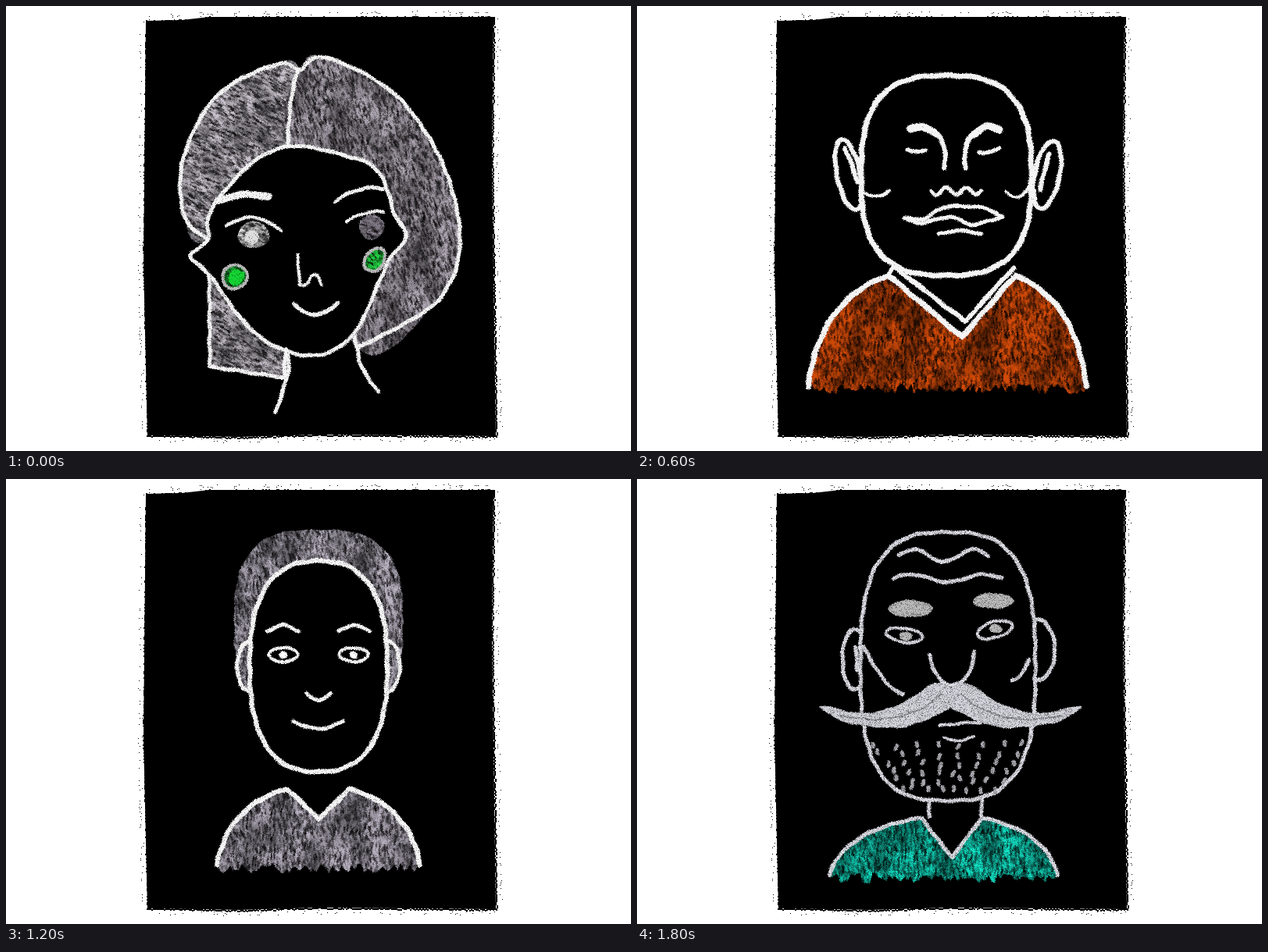
An HTML page with a canvas that plays this animation: 800x570 px, repeating every 2000 ms.

```html
<!DOCTYPE html>
<html lang="en">
<head>
<meta charset="utf-8">
<title>Chalk portraits</title>
<style>
html, body { margin: 0; width: 100%; height: 100%; overflow: hidden; background: #fff; }
canvas { position: absolute; left: 0; top: 0; width: 800px; height: 570px; }
.portrait { visibility: hidden; animation: show 2s step-end infinite; }
@keyframes show {
  0% { visibility: visible; }
  10%, 100% { visibility: hidden; }
}
</style>
</head>
<body>
<script>
const W = 800, H = 570, SLOT = 200, PI = Math.PI;
let seed = 7, g;

function rnd() {
  seed = (seed + 0x6D2B79F5) | 0;
  let t = Math.imul(seed ^ (seed >>> 15), 1 | seed);
  t = (t + Math.imul(t ^ (t >>> 7), 61 | t)) ^ t;
  return ((t ^ (t >>> 14)) >>> 0) / 4294967296;
}

function sheet(w = W, h = H) {
  const c = document.createElement('canvas');
  c.width = w;
  c.height = h;
  return c;
}

const points = s => s.match(/[\d.]+,[\d.]+/g).map(p => p.split(',').map(Number));
const flip = (s, axis) => points(s).map(([x, y]) => `${2 * axis - x},${y}`).join(' ') + (s.endsWith('z') ? 'z' : '');

// Smooth curve through points; a trailing z closes it, a leading M means plain path data.
function curve(s) {
  if (s instanceof Path2D) return s;
  if (s[0] === 'M') return new Path2D(s);
  const p = points(s), n = p.length, closed = s.endsWith('z'), path = new Path2D();
  const at = i => closed ? p[(i + n) % n] : p[Math.max(0, Math.min(n - 1, i))];
  path.moveTo(...p[0]);
  for (let i = 0; i < (closed ? n : n - 1); i++) {
    const [a, b, c, d] = [at(i - 1), at(i), at(i + 1), at(i + 2)];
    path.bezierCurveTo(b[0] + (c[0] - a[0]) / 6, b[1] + (c[1] - a[1]) / 6,
      c[0] - (d[0] - b[0]) / 6, c[1] - (d[1] - b[1]) / 6, c[0], c[1]);
  }
  return path;
}

// Points along a superellipse; a lower power is squarer, spike varies the radius.
function ring(cx, cy, rx, ry, power, from = 0, to = 2 * PI, n = 40, spike = 0) {
  const bend = v => Math.sign(v) * Math.abs(v) ** power;
  return Array.from({ length: n + 1 }, (_, i) => {
    const t = from + (to - from) * i / n, k = 1 + spike * (i % 2 ? rnd() : -rnd());
    return `${(cx + rx * k * bend(Math.cos(t))).toFixed(1)},${(cy + ry * k * bend(Math.sin(t))).toFixed(1)}`;
  }).join(' ');
}

// Row of round bumps from point to point.
function scallop(s, sweep, round = 0.52) {
  const p = points(s);
  return p.slice(1).reduce((d, [x, y], i) => {
    const r = Math.hypot(x - p[i][0], y - p[i][1]) * round;
    return `${d}A${r} ${r} 0 0 ${sweep} ${x} ${y}`;
  }, 'M' + p[0]);
}

// Wavy line.
function wave(x0, x1, y, rise, turns) {
  return Array.from({ length: 13 }, (_, i) =>
    `${x0 + (x1 - x0) * i / 12},${y - rise * Math.sin(i / 12 * PI * turns)}`).join(' ');
}

// Single arch between two points; a negative rise hangs down.
const arch = (x0, y0, x1, y1, rise) => `M${x0} ${y0}Q${(x0 + x1) / 2} ${(y0 + y1) / 2 - 2 * rise} ${x1} ${y1}`;

function oval(x, y, rx, ry = rx, turn = 0) {
  const path = new Path2D();
  path.ellipse(x, y, rx, ry, turn, 0, 7);
  return path;
}

function line(width, ...shapes) {
  g.lineWidth = width;
  for (const s of shapes) g.stroke(curve(s));
}

function both(axis, width, ...shapes) {
  for (const s of shapes) line(width, s, flip(s, axis));
}

function solid(color, ...shapes) {
  g.fillStyle = color;
  for (const s of shapes) g.fill(curve(s));
}

// Black inside, chalk around.
function hollow(width, ...shapes) {
  solid('#000', ...shapes);
  line(width, ...shapes);
}

const TILE = 256, streaks = sheet(TILE, TILE);
{
  const c = streaks.getContext('2d');
  c.lineCap = 'round';
  const mark = (len, width, alpha) => {
    const x = rnd() * TILE, y = rnd() * TILE;
    c.lineWidth = width;
    c.strokeStyle = `rgba(0,0,0,${alpha})`;
    c.beginPath();
    for (const u of [x, x - TILE]) {
      for (const v of [y, y - TILE]) {
        c.moveTo(u, v);
        c.lineTo(u + len, v);
      }
    }
    c.stroke();
  };
  for (let i = 0; i < 160; i++) mark(8 + rnd() * 14, 12 + rnd() * 14, 0.12);
  for (let i = 0; i < 6500; i++) mark(1 + rnd() * 7, 0.8 + rnd() * 1.4, 0.2 + rnd() * 0.5);
}

// Chalk rubbing: flat colour under dark streaks at an angle in degrees.
function rub(color, angle, ...shapes) {
  const pattern = g.createPattern(streaks, 'repeat');
  pattern.setTransform(new DOMMatrix().rotate(angle));
  for (const s of shapes) {
    solid(color, s);
    g.fillStyle = pattern;
    g.fill(curve(s));
  }
}

// Rubbed garment with round shoulders, V neck and ragged hem.
function shirt(color, width, [left, right, top], [x0, x1, bottom], [vx, vy]) {
  const cy = top + (bottom - top) * 0.22;
  const cl = x0 + (left - x0) * 0.14, cr = x1 - (x1 - right) * 0.14;
  let hem = '';
  for (let x = x1 - 4; x > x0; x -= 4) hem += `L${x} ${bottom - 4 + rnd() * 14}`;
  const body = `M${left} ${top}L${vx} ${vy} ${right} ${top}Q${cr} ${cy} ${x1} ${bottom}${hem}L${x0} ${bottom}Q${cl} ${cy} ${left} ${top}Z`;
  rub(color, 88, body);
  line(width, `M${x0} ${bottom}Q${cl} ${cy} ${left} ${top}L${vx} ${vy} ${right} ${top}Q${cr} ${cy} ${x1} ${bottom}`);
  return curve(body);
}

// Wobble and dust the finished drawing.
function weather(dust) {
  const src = g.getImageData(0, 0, W, H), out = g.createImageData(W, H);
  const from = new Uint32Array(src.data.buffer), to = new Uint32Array(out.data.buffer);
  for (let y = 4; y < H - 4; y++) {
    for (let x = 165; x < 640; x++) {
      const dx = Math.round(Math.sin(y * 0.21 + x * 0.07) * 0.6 + (rnd() - 0.5) * 1.1);
      const dy = Math.round(Math.sin(x * 0.19 - y * 0.05) * 0.6 + (rnd() - 0.5) * 1.1);
      const i = y * W + x, v = from[i + dy * W + dx];
      if (!v) continue;
      to[i] = v;
      const k = rnd() < dust ? 0.55 + rnd() * 0.35 : 1;
      for (let c = 0; c < 3; c++) out.data[i * 4 + c] *= k;
    }
  }
  g.putImageData(out, 0, 0);
}

function paper() {
  const c = sheet(), edge = points('179,19 225,18 260,14 400,14 624,14 622,200 627,551 400,549 300,552 181,550 176,330');
  g = c.getContext('2d');
  solid('#000', 'M' + edge.join('L') + 'Z');
  edge.forEach(([x, y], i) => {
    const [u, v] = edge[(i + 1) % edge.length], len = Math.hypot(u - x, v - y);
    const nx = (v - y) / len, ny = (x - u) / len;
    const dot = (s, d, size) => g.fillRect(Math.round(x + (u - x) * s / len + nx * d), Math.round(y + (v - y) * s / len + ny * d), size, size);
    for (let s = 0; s < len; s += 2) {
      dot(s, rnd() * 2 - 1, 2);
      if (rnd() < 0.08) dot(s, rnd() * 6, 1);
      if (rnd() < 0.18) dot(s, 5 + rnd() * 3, 1);
    }
  });
  document.body.append(c);
}

function bob() {
  const left = '374,82 345,75 270,115 227,195 228,268 258,300', right = '376,82 410,66 500,115 560,205 581,305 550,380 450,438';
  const face = '262,262 310,205 360,180 420,188 475,210 498,268 512,295 488,330 445,420 390,448 320,420 258,342 236,320 258,300z';
  const lock = 'M260 345L261 462 356 476 358 440Z';
  rub('#c8c2cc', 30, left + ' 360,180z', lock);
  rub('#aca4b0', 75, right + ' 360,180z');
  line(5, left, right, lock);
  hollow(5, face);
  line(5, '374,80 365,120 360,180', '358,440 362,465 345,521', '446,420 455,462 476,494',
    arch(368, 382, 425, 380, -14), arch(422, 250, 482, 234, 7));
  line(9, arch(272, 250, 336, 245, 6));
  line(4, arch(282, 282, 352, 288, 14), arch(436, 276, 484, 264, 5), 'M373 318L376 357Q387 360 390 346 400 340 404 358');
  rub('#fff', 20, oval(317, 293, 20, 17));
  solid('#ddd', oval(315, 296, 9));
  rub('#aaa0b0', 20, oval(468, 283, 16));
  const cheeks = [oval(293, 347, 16, 15), oval(472, 325, 12, 16, 0.6)];
  rub('#28f04c', 40, ...cheeks);
  solid('#14d232', oval(294, 348, 10));
  g.strokeStyle = '#bbb';
  line(4, ...cheeks);
}

// Plain sitter built from a few proportions.
function sitter({ top, rx, hair, spread, rim }) {
  const cx = 400, chin = top + 300, eye = top + 150;
  shirt('#b4aebc', 6, [360, 440, chin + 22], [cx - spread, cx + spread, chin + 120], [cx, chin + 60]);
  rub('#b8b2c0', 80, ring(cx, top + 110, rx + 20, 110 + hair, 0.7));
  line(5, oval(cx - rx, eye + 15, 16, 32), oval(cx + rx, eye + 15, 16, 32));
  hollow(6, ring(cx, top + 165, rx, 135, 0.8));
  both(cx, 5, '335,' + (eye - 30) + ' 355,' + (eye - 38) + ' 374,' + (eye - 30));
  for (const x of [cx - 45, cx + 45]) {
    line(4, oval(x, eye, rim, rim / 2));
    solid('#fff', oval(x, eye, 5));
  }
  line(5, arch(cx - 15, eye + 50, cx + 15, eye + 50, -8), arch(cx - 32, eye + 85, cx + 32, eye + 85, -10));
}

function curls() {
  const half = '398,91 505,118 540,178 563,255 550,362';
  const crown = scallop(flip(half, 398).split(' ').reverse().join(' ') + half.slice(6), 1, 0.75);
  const tails = ['260,368 320,398 378,374 374,442 325,447 262,410z', '454,368 500,372 549,363 524,446 480,430z'];
  rub('#d8d2e0', 65, crown + 'L452 372 380 378 322 395Z');
  solid('#000', ...tails);
  rub('#e0740c', 85, ...tails);
  line(5, crown, ...tails.map(t => 'M' + points(t).slice(2).join('L')).slice(0, 0));
  line(5, 'M246 362Q262 365 262 372Q250 395 265 412L305 434Q340 456 366 447 383 410 378 374', 'M550 362Q535 400 528 438 505 460 480 430L452 372');
  hollow(5, oval(395, 285, 103, 99));
  line(4, 'M377 96Q362 140 364 186', 'M458 105L437 198', arch(306, 243, 358, 218, 7), arch(435, 230, 478, 225, 5),
    arch(310, 272, 358, 269, 6), arch(448, 266, 488, 267, 6), arch(388, 308, 415, 308, -5), arch(380, 331, 436, 325, -7));
  const cheeks = [oval(342, 311, 14), oval(470, 300, 15)];
  rub('#16c060', 30, ...cheeks);
  line(4, ...cheeks);
}

function elder() {
  shirt('#d24a08', 7, [322, 484, 345], [219, 575, 487], [416, 424]);
  line(6, 'M322 345L328 333 420 404 482 335', oval(271, 216, 15, 46, -0.2), oval(525, 216, 16, 44, 0.2),
    arch(528, 190, 516, 235, 3), arch(266, 182, 282, 225, 3));
  hollow(7, ring(396, 217, 109, 128, 0.72));
  both(407, 6, '350,160 372,156 392,176 394,208');
  both(407, 9, '350,157 366,154 382,164');
  line(5, arch(346, 184, 370, 184, -3), arch(438, 187, 464, 182, -3), wave(377, 440, 237, -5, 5),
    '342,272 370,272 392,258 440,258 468,270', '342,272 365,278 400,270 430,280 468,270', arch(386, 292, 440, 292, 4));
  line(4, arch(290, 238, 323, 236, -7), arch(473, 238, 502, 233, -9));
}

function redHair() {
  rub('#f8560f', 65, ring(393, 215, 110, 155, 0.8, PI - 0.12, 2 * PI + 0.12, 46, 0.09).replace(/^/, 'M').replaceAll(' ', 'L'));
  g.strokeStyle = '#dddde2';
  const coat = '355,408 315,453 290,447 277,465 270,515', lapel = '370,430 374,470 390,522';
  for (const turn of [s => s, s => flip(s, 401)]) {
    const [outer, inner] = [turn(coat), turn(lapel)];
    rub('#92929c', 88, 'M' + points(outer).join('L') + 'L' + points(inner).reverse().join('L') + 'Z');
    line(6, outer, inner);
  }
  line(6, oval(301, 292, 17, 45, -0.4), oval(489, 280, 16, 41, 0.25));
  line(4, arch(290, 272, 305, 305, 4), arch(494, 262, 482, 288, 4));
  solid('#000', '312,250 345,118 440,115 488,225 466,292 430,425 372,428 335,322z');
  line(6, '306,250 318,170 345,118 375,120 405,127 440,115 470,160 488,225 480,255 447,302',
    '330,322 342,350 352,390 372,428 400,436 430,425 458,350 466,292', '358,245 362,285 385,305 405,300 428,262 410,243 400,250');
  const whiskers = '342,350 350,325 385,305 425,315 455,357 425,342 395,330z';
  rub('#b4b4bc', 35, whiskers);
  line(5, whiskers, wave(353, 438, 149, 5, 3), wave(330, 455, 178, 8, 3), arch(306, 250, 340, 260, -5), arch(440, 258, 470, 238, -5),
    '365,350 395,358 435,345 425,370 405,378 385,372z');
  line(9, wave(322, 458, 204, 6, 3));
  line(4, oval(338, 229, 19, 9, 0.15), oval(433, 223, 20, 10, -0.1));
  solid('#ccc', oval(342, 230, 7, 5), oval(434, 223, 7, 5));
  g.strokeStyle = '#b9b9c0';
  for (let i = 0; i < 3; i++) line(7, `M${394 + i * 9} 388v${62 + rnd() * 20}`);
}

function afro() {
  const body = shirt('#9089a2', 5, [352, 435, 381], [270, 513, 493], [380, 475]);
  g.save();
  g.clip(body);
  hollow(5, oval(312, 420, 24), oval(357, 446, 13, 18), oval(425, 440, 19), oval(295, 475, 20), oval(468, 408, 22), oval(482, 474, 22), oval(418, 489, 14));
  g.restore();
  line(5, scallop(ring(399, 190, 145, 106, 0.8, PI - 0.95, 2 * PI + 0.95, 11), 1));
  hollow(6, ring(405, 160, 91, 223, 0.9, 0, PI) + ' 315,165');
  line(5, scallop('315,164 366,155 413,147 465,156', 0, 0.8), 'M495 175Q490 155 465 156 405 170 420 246', arch(362, 155, 378, 168, 3),
    '370,238 370,255 380,262 405,259 435,262 445,255 447,236',
    '363,305 380,284 405,287 418,283 450,298 435,325 405,343 380,330z', wave(366, 450, 304, 3, 3));
  line(3, 'M403 312V324');
  rub('#eee', 10, oval(461, 190, 22, 12, -0.3));
  line(4, arch(326, 193, 382, 200, 15) + arch(382, 200, 326, 193, -9).replace('M', 'L'));
  solid('#fff', oval(352, 187, 10, 7), oval(462, 187, 8, 7));
}

function beard() {
  const bumps = scallop(ring(402, 350, 154, 106, 0.6, PI + 0.25, 0, 15), 0);
  const mouth = 'M318 302L400 299 484 302 415 328 478 335Q395 388 322 332L358 324 330 320Z';
  rub('#a096ac', 50, bumps + 'L520 300 450 248Q390 292 346 246L272 282Z');
  hollow(6, mouth);
  line(6, bumps, arch(272, 282, 345, 246, 3), arch(450, 248, 556, 350, 16), 'M272 282L258 318',
    oval(275, 184, 21, 46), oval(524, 190, 22, 50), arch(275, 163, 285, 185, 3), wave(515, 510, 200, 0, 1),
    '515,175 508,195 518,210 508,225', arch(240, 430, 198, 474, 5), arch(548, 450, 566, 521, 4));
  const skull = '272,282 298,160 330,82 405,60 465,85 502,190 515,295';
  solid('#000', 'M275 275L298 160 330 82 405 60 465 85 502 190 510 285 450 248Q390 292 346 246Z');
  line(7, skull, 'M346 230C352 284 448 280 452 228');
  line(14, arch(325, 158, 364, 140, 6), arch(436, 138, 474, 147, 9));
  solid('#fff', oval(347, 180, 8, 10), oval(436, 188, 11));
}

function moustache() {
  g.strokeStyle = '#dcdce4';
  shirt('#12e0c4', 5, [364, 441, 434], [246, 538, 508], [403, 485]);
  line(5, 'M374 412V432', 'M441 410V430', oval(278, 231, 15, 39), oval(511, 219, 24, 39), arch(280, 215, 282, 245, 1));
  hollow(5, ring(398, 240, 112, 172, 0.7));
  line(5, wave(335, 450, 98, 8, 3), wave(328, 467, 127, 5, 3), 'M374 225C385 278 425 278 432 222',
    arch(290, 215, 340, 276, -10), arch(480, 258, 502, 232, -5));
  line(4, arch(387, 316, 440, 312, 1), arch(394, 332, 430, 330, -4), oval(342, 200, 23, 9, 0.15), oval(458, 193, 23, 10, -0.3));
  solid('#bbb', oval(350, 166, 28, 11), oval(456, 156, 26, 10), oval(344, 201, 8, 6), oval(459, 192, 8, 6));
  const wing = '402,268 380,262 340,287 290,300 235,290 262,310 310,318 350,316 402,292z';
  solid('#d2d2da', wing, flip(wing, 402));
  g.strokeStyle = '#85858c';
  both(402, 1.5, '260,303 310,308 360,296 390,275');
  g.strokeStyle = '#a9a9b0';
  for (let i = 0; i < 48; i++) {
    const row = i >> 3, x = 304 + row * 7 + (i & 7) * (192 - row * 14) / 7 + rnd() * 10 - 5, y = 336 + row * 11 + rnd() * 7;
    line(5, `M${x} ${y}l${rnd() * 3 - 2} 4`);
  }
}

paper();
const cast = [
  [bob, 0.12],
  [() => sitter({ top: 95, rx: 95, hair: 80, spread: 165, rim: 18 }), 0.12],
  [curls, 0.1],
  [elder, 0.02],
  [() => sitter({ top: 85, rx: 100, hair: 15, spread: 160, rim: 32 }), 0.15],
  [redHair, 0.4],
  [() => sitter({ top: 75, rx: 88, hair: 10, spread: 130, rim: 18 }), 0.12],
  [afro, 0.15],
  [beard, 0.03],
  [moustache, 0.35]
];
const portraits = cast.map(([paint, dust], i) => {
  const c = sheet();
  c.className = 'portrait';
  c.style.animationDelay = i * SLOT + 'ms';
  g = c.getContext('2d', { willReadFrequently: true });
  g.lineCap = g.lineJoin = 'round';
  g.strokeStyle = '#f4f4f4';
  paint();
  weather(dust);
  return c;
});
document.body.append(...portraits);
</script>
</body>
</html>
```
